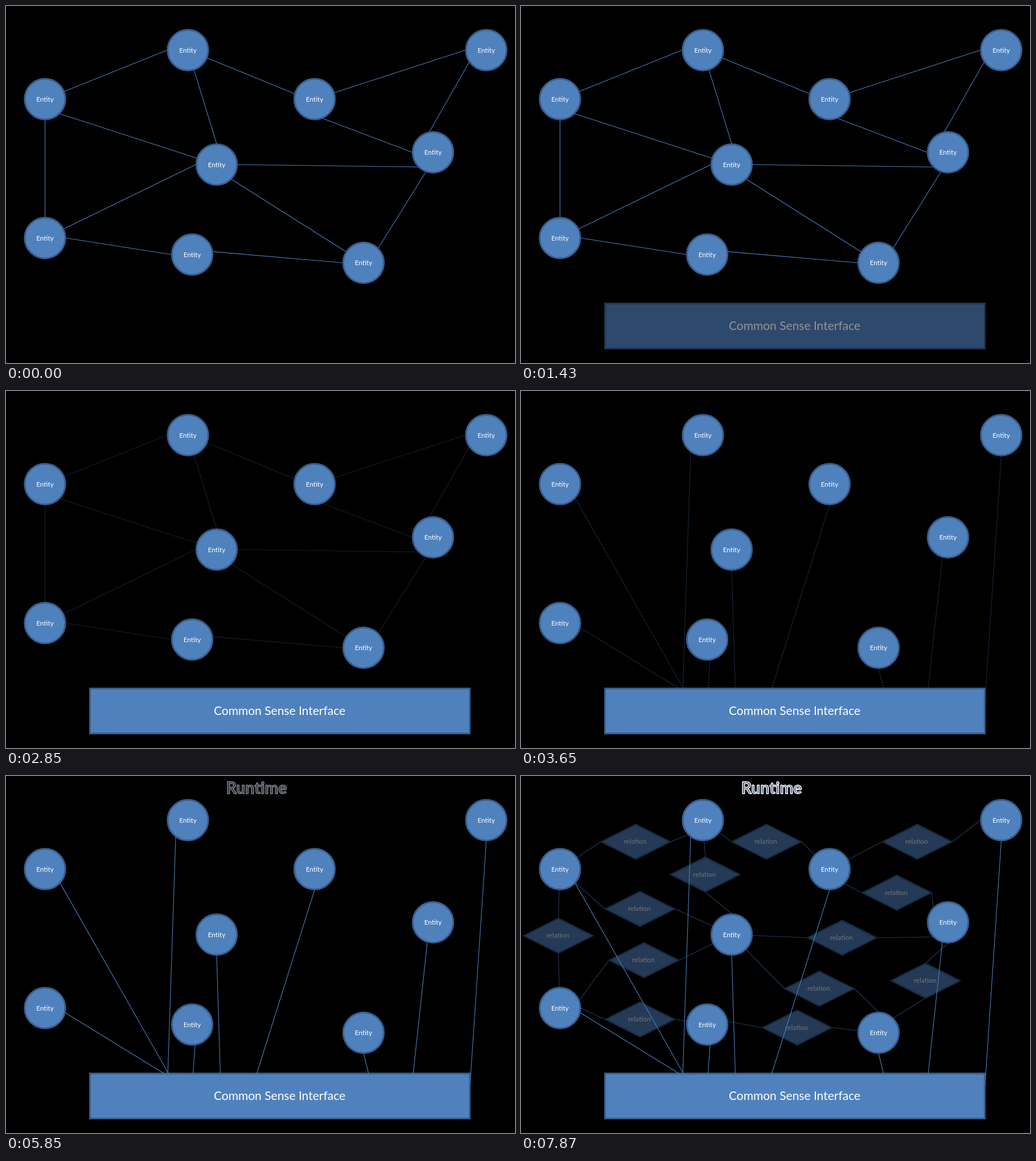
Animation of 894x627 px, one loop 8000 ms. Source, as an HTML page with a canvas:

```html
<!DOCTYPE html>
<html lang="en">
<head>
<meta charset="utf-8">
<style>
html, body { margin: 0; width: 100%; height: 100%; overflow: hidden; background: #000; }
canvas { display: block; }
</style>
</head>
<body>
<canvas id="stage" width="894" height="627"></canvas>
<script>
const W = 894, H = 627, LOOP = 8000, RIM = 36.5;
const FILL = '#4f81bd', BORDER = '#385d8a', LINE = '#4a7ebb';
const stage = document.getElementById('stage').getContext('2d');

const entities = {
  A: [319.5, 77.5], B: [843.5, 77.5], C: [68.5, 163.5],
  D: [542, 163.5], E: [750, 257], F: [370, 278.5],
  G: [68.5, 407.5], H: [327, 436.5], I: [628, 451]
};

// "A45" is the point on A's rim at 45 degrees; a bare "A" faces the other end.
const edges = [
  'C A180', 'A D165', 'D B180', 'B215 E100', 'D-68 E180', 'A F90', 'C-45 F',
  'C G', 'G F180', 'G0 H180', 'H8 I180', 'F-45 I', 'F0 E225', 'E250 I45'
];

// Centre of each diamond, by the pair it relates
const diamonds = {
  'C A225': [201.5, 115.5], 'A D': [431, 115.5], 'D B180': [696, 115.5],
  'D-45 E135': [660, 205], 'A F90': [323.5, 173], 'C F': [209, 233.5],
  'C G': [65.5, 280.5], 'F E225': [564, 284], 'G22 F': [216, 323.5],
  'F I90': [524, 373.5], 'G0 H': [209, 427.5], 'H9 I': [485, 442],
  'E270 I45': [710.5, 359.5]
};

// Where each entity's link ends inside the bar
const links = {
  'C-43': 297, A234: 283.5, 'G-13': 311, 'H-82': 327, 'F-90': 377,
  'D-90': 434, 'I-90': 642, E254: 713, 'B-90': 815
};
const LINK_DEPTH = 543;

function rimPoint(end, target) {
  const [x, y] = entities[end[0]];
  const angle = end.length > 1
    ? end.slice(1) * Math.PI / 180
    : Math.atan2(y - target[1], target[0] - x);
  return [x + RIM * Math.cos(angle), y - RIM * Math.sin(angle)];
}

function anchor(end) {
  return end.length > 1 ? rimPoint(end) : entities[end];
}

function layer(draw) {
  const canvas = document.createElement('canvas');
  canvas.width = W;
  canvas.height = H;
  const g = canvas.getContext('2d');
  g.textAlign = 'center';
  g.lineWidth = 1.1;
  g.strokeStyle = LINE;
  draw(g);
  return canvas;
}

function line(g, from, to) {
  g.beginPath();
  g.moveTo(...from);
  g.lineTo(...to);
  g.stroke();
}

function paint(g, path, width) {
  g.save();
  g.fillStyle = FILL;
  g.strokeStyle = BORDER;
  g.lineWidth = width;
  g.fill(path);
  g.stroke(path);
  g.restore();
}

function label(g, text, x, y, size) {
  g.font = `${size}px Lato, sans-serif`;
  g.fillStyle = '#fff';
  g.fillText(text, x, y);
}

function drawEdge(g, pair) {
  const [a, b] = pair.split(' ');
  line(g, rimPoint(a, anchor(b)), rimPoint(b, anchor(a)));
}

function drawRelation(g, pair, [x, y]) {
  const [a, b] = pair.split(' ');
  const [ax, ay] = entities[a[0]], [bx, by] = entities[b[0]];
  const upright = Math.abs(by - ay) > Math.abs(bx - ax);
  const dx = upright ? 0 : 61.5, dy = upright ? 30.5 : 0;
  const start = [x - dx, y - dy], end = [x + dx, y + dy];
  line(g, rimPoint(a, start), start);
  line(g, end, rimPoint(b, end));

  const path = new Path2D();
  path.moveTo(x - 60.5, y);
  path.lineTo(x, y - 30.3);
  path.lineTo(x + 60.5, y);
  path.lineTo(x, y + 30.3);
  path.closePath();
  paint(g, path, 2.4);
  label(g, 'relation', x - 1, y + 3.5, 12);
}

function drawEntity(g, [x, y]) {
  const path = new Path2D();
  path.arc(x, y, 35.7, 0, Math.PI * 2);
  paint(g, path, 3);
  label(g, 'Entity', x, y + 4.3, 11.8);
}

function drawBar(g) {
  const path = new Path2D();
  path.rect(147.5, 522.5, 667, 79);
  paint(g, path, 2.8);
  label(g, 'Common Sense Interface', 480.5, 569.3, 21);
}

function drawTitle(g) {
  g.font = 'bold 28.4px Lato, sans-serif';
  g.lineJoin = 'round';
  g.lineWidth = 1.4;
  g.strokeStyle = '#fff';
  g.fillStyle = '#54698f';
  g.fillText('Runtime', 440, 31.2);
  g.strokeText('Runtime', 440, 31.2);
}

// Each layer fades along its own time, opacity keys.
const layers = [
  {
    image: layer(g => edges.forEach(pair => drawEdge(g, pair))),
    fade: [[1950, 1], [3150, 0]]
  },
  {
    image: layer(g => Object.entries(diamonds).forEach(d => drawRelation(g, ...d))),
    fade: [[6850, 0], [7270, 0.125], [7870, 0.455]]
  },
  {
    image: layer(g => Object.values(entities).forEach(e => drawEntity(g, e))),
    fade: [[0, 1]]
  },
  { image: layer(drawBar), fade: [[615, 0], [2020, 1]] },
  {
    image: layer(g => Object.entries(links).forEach(([end, x]) =>
      line(g, rimPoint(end), [x, LINK_DEPTH]))),
    fade: [[3200, 0], [4630, 1]]
  },
  { image: layer(drawTitle), fade: [[5210, 0], [6430, 1]] }
];

// Fades advance in steps of about a fifth of a second, with rests between runs.
const runs = [[620, 4650, 20], [5250, 6450, 6], [6870, 7870, 5]];

function stepped(t) {
  let time = 0;
  for (const [start, end, count] of runs) {
    if (t < start) break;
    const step = (end - start) / count;
    time = start + Math.min(count, Math.floor((t - start) / step + 0.03)) * step;
  }
  return time;
}

function valueAt(keys, t) {
  if (t <= keys[0][0]) return keys[0][1];
  for (let i = 1; i < keys.length; i++) {
    const [t0, v0] = keys[i - 1], [t1, v1] = keys[i];
    if (t < t1) return v0 + (v1 - v0) * (t - t0) / (t1 - t0);
  }
  return keys[keys.length - 1][1];
}

const begin = performance.now();

function frame() {
  const t = stepped((performance.now() - begin) % LOOP);
  stage.globalAlpha = 1;
  stage.fillStyle = '#000';
  stage.fillRect(0, 0, W, H);
  for (const { image, fade } of layers) {
    stage.globalAlpha = valueAt(fade, t);
    stage.drawImage(image, 0, 0);
  }
  requestAnimationFrame(frame);
}
frame();
</script>
</body>
</html>
```
